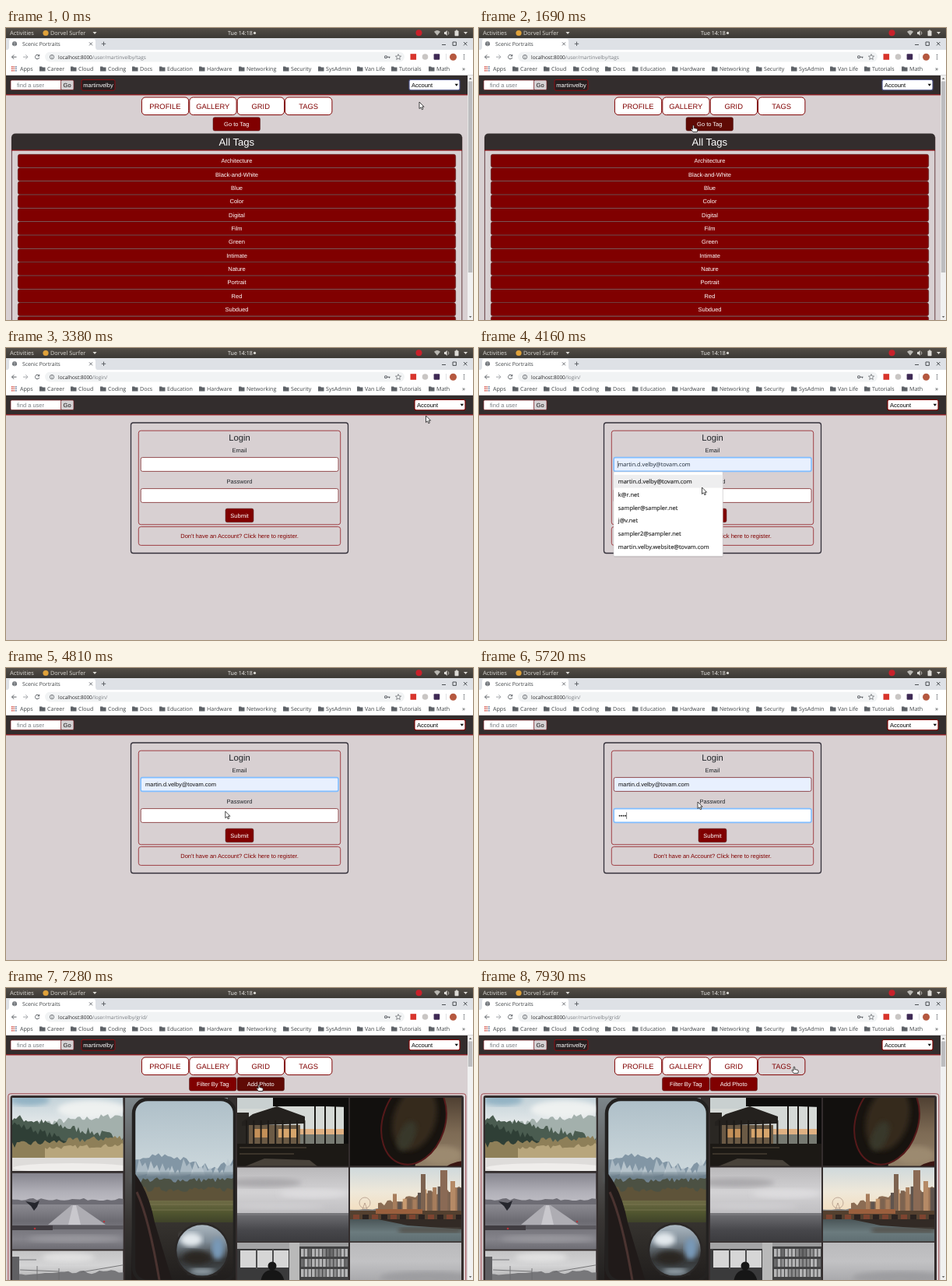
Animation of 600 by 375 pixels, one loop 8000 ms. Source, as an HTML page:

```html
<!DOCTYPE html>
<html lang="en">
<head>
<meta charset="utf-8">
<title>Scenic Portraits</title>
<style>
html, body { margin: 0; width: 100%; height: 100%; overflow: hidden; background: #d8d0d2; }
svg { display: block; width: 600px; height: 375px; }
text { font-family: "Liberation Sans", Arial, sans-serif; white-space: pre; text-rendering: geometricPrecision; }
.ui { font-family: "Open Sans", "Noto Sans", sans-serif; }
.mid { text-anchor: middle; }
.btn { fill: #800000; stroke: #4a1a1a; stroke-width: .5; }
.btn.over { fill: #5f0a05; }
.nav { fill: #fff; stroke: #800000; stroke-width: 1; }
.nav.over { fill: #ddd5d7; }
.box { fill: none; stroke: #921c22; stroke-width: .8; }
.field { fill: #fff; stroke: #7b2226; stroke-width: .8; }
.field.fill { fill: #e8f0fe; }
.field.focus { stroke: #80bdff; stroke-width: 1.6; }
</style>
</head>
<body>
<svg id="stage" viewBox="0 0 600 375"></svg>
<script>
const MAROON = '#800000', DARK = '#332d2d', PAGE = '#d8d0d2';
const USER = 'martinvelby', MAIL = 'martin.d.velby@tovam.com';
const STEP = 130, LOOP = 8000;

const rect = (x, y, w, h, fill, more = '') =>
  `<rect x="${x}" y="${y}" width="${w}" height="${h}" fill="${fill}" ${more}/>`;
const shape = (cls, x, y, w, h, r, more = '') =>
  `<rect class="${cls}" x="${x}" y="${y}" width="${w}" height="${h}" rx="${r}" ${more}/>`;
const text = (x, y, size, fill, str, cls = '', more = '') =>
  `<text x="${x}" y="${y}" font-size="${size}" fill="${fill}" class="${cls}" ${more}>${str}</text>`;
const path = (d, fill, more = '') => `<path d="${d}" fill="${fill}" ${more}/>`;
const line = (d, stroke, w = 1, more = '') =>
  `<path d="${d}" fill="none" stroke="${stroke}" stroke-width="${w}" ${more}/>`;
const disc = (x, y, r, fill, more = '') => `<circle cx="${x}" cy="${y}" r="${r}" fill="${fill}" ${more}/>`;
const oval = (x, y, rx, ry, fill, more = '') =>
  `<ellipse cx="${x}" cy="${y}" rx="${rx}" ry="${ry}" fill="${fill}" ${more}/>`;
const group = (id, body) => `<g id="${id}">${body}</g>`;
const range = (n, fn) => Array.from({ length: n }, (_, i) => fn(i)).join('');

let seed = 7;
const rand = () => (seed = seed * 16807 % 2147483647) / 2147483647;

let defs = '<filter id="soft"><feGaussianBlur stdDeviation=".7"/></filter>' +
  '<filter id="hazy"><feGaussianBlur stdDeviation="3"/></filter>';
const HAZY = 'filter="url(#hazy)"';
function grad(id, ...stops) {
  defs += `<linearGradient id="${id}" x2="0" y2="1">` + stops.map((c, i) =>
    `<stop offset="${i / (stops.length - 1)}" stop-color="${c}"/>`).join('') + '</linearGradient>';
  return `url(#${id})`;
}

// Jagged silhouette: height follows top(x), closed along the base line
function ridge(x0, x1, top, jag, base, step, fill) {
  let d = `M${x0} ${base}`;
  for (let x = x0; x <= x1; x += step) d += `L${x} ${(top(x) - rand() * jag).toFixed(1)}`;
  return path(d + `L${x1} ${base}Z`, fill);
}

function browser() {
  const marks = [[43, 'Career'], [83, 'Cloud'], [121, 'Coding'], [162, 'Docs'], [197, 'Education'],
    [248, 'Hardware'], [299, 'Networking'], [356, 'Security'], [401, 'SysAdmin'], [451, 'Van Life'],
    [495, 'Tutorials'], [543, 'Math']];
  const folder = x => path(`M${x} 49.5h3l1 1h3.5v5h-7.5z`, '#5f6368');
  const gray = '#5f6368', pale = '#dcdad5';
  return rect(0, 0, 600, 13, grad('panel', '#524d47', '#47433e', '#3b3935')) +
    text(5, 9, 7.5, pale, 'Activities', 'ui') +
    disc(51, 6.5, 3.6, '#e0a23a') +
    text(57, 9, 7.3, pale, 'Dorvel Surfer', 'ui') +
    path('M111.5 5h5l-2.5 3z', pale) +
    text(285, 9, 7.1, '#f2f1ee', 'Tue 14:18', 'ui') + disc(319.5, 6.4, 1.6, pale) +
    disc(530.5, 6.3, 4, '#c8202a') +
    path('M550 4.8q4-3.400 8 0l-4 5z', '#b9b7b2') +
    path('M563 5h1.600l2-2v7l-2-2H563z', pale) + line('M568 4.5q1.800 2 0 4', pale, .8) +
    rect(576.5, 3.6, 5, 6.6, pale, 'rx=".6"') + rect(578, 2.6, 2, 1.2, pale) +
    path('M588 5h5l-2.5 3z', pale) +
    rect(0, 13, 600, 15, '#dee1e6') +
    path('M2 28q2-1 2-3v-8q0-3 3-3h105q3 0 3 3v8q0 2 2 3z', '#fff') +
    disc(11, 20.3, 3, gray) + line('M8.3 19.3h5.4M9 22h4M11 17.3v6', '#c8cacd', .6) +
    text(21, 22.9, 6.8, '#3c4043', 'Scenic Portraits', 'ui') +
    line('M107 18.4l4 4m0-4l-4 4', gray, .9) + line('M122.8 20.3h5.4m-2.7-2.7v5.4', gray, 1) +
    line('M560 21.5h5M588 18l4.4 4.4m0-4.4l-4.4 4.4', '#3c4043', .9) +
    line('M574 18h4.4v4.4h-4.4z', '#3c4043', .9) +
    rect(0, 28, 600, 33, '#fff') +
    line('M13.5 37.2H7.5l2.8-2.8m-2.8 2.8l2.8 2.8', gray, 1) +
    line('M22 37.2h6l-2.8-2.8m2.8 2.8l-2.8 2.8', '#a5a8ac', 1) +
    line('M42.2 35.4a2.7 2.7 0 1 0 .5 2.6', gray, 1) + path('M43.2 33.6v2.9h-2.9z', gray) +
    rect(50, 30.8, 462, 12.6, '#f1f3f4', 'rx="6.3"') +
    disc(59, 37.2, 2.7, 'none', `stroke="${gray}" stroke-width=".8"`) + line('M59 36.6v2.2M59 35.2v.8', gray, .8) +
    disc(488, 37.2, 1.5, 'none', `stroke="${gray}" stroke-width="1.1"`) + line('M489.5 37.2h4m-1 0v1.6', gray, 1.1) +
    path('M504 33.6l1 2.4 2.6.2-2 1.7.7 2.6-2.3-1.4-2.3 1.4.7-2.6-2-1.7 2.6-.2z', 'none', `stroke="${gray}" stroke-width=".7"`) +
    rect(519.5, 33.2, 7.6, 7.6, '#d8342c') + disc(538.5, 37, 3.8, '#c9c6c4') +
    rect(549.6, 33.2, 7.6, 7.6, '#3f2a55', 'rx="1"') +
    line('M565.5 33v8', '#d0d3d6', .7) + disc(574.5, 37.2, 4.5, '#b5583f') +
    range(3, i => disc(588.5, 34.6 + i * 2.6, .8, gray)) +
    range(9, i => rect(7 + i % 3 * 2.5, 49 + (i / 3 | 0) * 2.5, 1.6, 1.6, ['#d9534a', '#c9655b', '#6a7f9e'][i % 3])) +
    text(18, 55, 7.1, '#3c4043', 'Apps', 'ui') +
    marks.map(([x, s]) => folder(x) + text(x + 10, 55, 7.1, '#3c4043', s, 'ui')).join('') +
    text(586, 55, 8, '#3c4043', '»', 'ui') + rect(0, 60, 600, 1, '#d5d5d6');
}

const address = rest =>
  text(67, 39.5, 6.5, '#202124', `localhost:8000<tspan fill="#777b80">${rest}</tspan>`, 'ui');

function header(w, user, outline = MAROON) {
  const x = w - 75;
  return rect(0, 61, w, 24.5, DARK) + rect(0, 85.2, w, 1.2, '#8c0d12') +
    rect(6, 67, 65, 12.5, '#fff', 'stroke="#7b2226" stroke-width=".7" rx="1.5"') +
    text(14, 75.7, 7.5, '#7b7f84', 'find a user') +
    rect(70.5, 67, 16.5, 12.5, '#d5d2d4', 'stroke="#7b2226" stroke-width=".7" rx="1.5"') +
    text(73.6, 75.9, 7.5, '#111', 'Go') +
    (user ? rect(97, 66.4, 43, 13.8, '#261f20', 'rx="2" stroke="#8c0d12"') + text(99.3, 75.9, 7.5, '#fff', USER) : '') +
    rect(x, 66.5, 65, 13.2, '#fff', `rx="2" stroke="${outline}" stroke-width="1.1"`) +
    text(x + 3, 75.6, 7.5, '#000', 'Account') + path(`M${x + 58.6} 71.8h4.4l-2.2 3z`, '#111');
}

const scrollbar = end => rect(593, 61, 7, 314, '#f1f1f1') + path('M594.8 66h3.6l-1.8-2.2z', '#6b6b6b') +
  path('M594.8 370h3.6l-1.8 2.2z', '#6b6b6b') + rect(593.8, 68.5, 5.4, end - 68.5, '#bdbdbf');

const tabs = () => ['PROFILE', 'GALLERY', 'GRID', 'TAGS'].map((s, i) => {
  const x = 174.4 + i * 61.4;
  return shape('nav hot', x, 89, 60.3, 22.6, 4.7) + text(x + 30, 103.7, 9.4, MAROON, s, 'mid');
}).join('');

const button = (x, y, w, h, s) => shape('btn hot', x, y, w, h, 2.2) +
  text(x + w / 2, y + h / 2 + 2.7, 7.5, '#fff', s, 'mid');

function tagsPage() {
  const tags = ['Architecture', 'Black-and-White', 'Blue', 'Color', 'Digital', 'Film', 'Green',
    'Intimate', 'Nature', 'Portrait', 'Red', 'Subdued', ''];
  return address(`/user/${USER}/tags`) + header(593, true, '#4a4f86') + scrollbar(314) + tabs() +
    button(266, 114.8, 60.5, 17.2, 'Go to Tag') +
    line('M7.4 375V140M585.8 375V140', '#5c3034', .9) +
    path('M7 157v-16q0-5.5 5.5-5.5h568q5.5 0 5.5 5.5v16z', DARK) + rect(7, 156.4, 579, 1.2, '#8c0d12') +
    text(296.3, 150.6, 13.1, '#fff', 'All Tags', 'mid') +
    tags.map((s, i) => {
      const y = 162.3 + i * 17.34;
      return shape('btn hot', 15.3, y, 562.4, 16.7, 2.4) + text(296.5, y + 10.9, 7.5, '#fff', s, 'mid');
    }).join('') +
    group('menu', rect(518, 79.8, 65.5, 11.4, '#3d9be9', 'stroke="#2f6ea8" stroke-width=".5"') +
      text(521.5, 87.8, 7.5, '#b9dcf8', 'Login'));
}

function loginPage() {
  const mails = [MAIL, 'k@r.net', 'sampler@sampler.net', 'j@v.net', 'sampler2@sampler.net',
    'martin.velby.website@tovam.com'];
  return address('/login/') + header(600, false) +
    rect(160.5, 96, 279, 167.5, 'none', 'rx="3" stroke="#34303a" stroke-width="1.3"') +
    shape('box', 170.3, 106.2, 259.4, 120.6, 3) + shape('box', 170.3, 229.6, 259.4, 23.8, 3) +
    text(300, 119.3, 11.25, '#212529', 'Login', 'mid') +
    text(300, 133.6, 7.5, '#212529', 'Email', 'mid') +
    shape('field', 173.2, 140.6, 253.8, 17.8, 2.2, 'id="mailBox"') +
    group('mailPeek', line('M178.3 145v9', '#222', .6) + text(178.4, 152.1, 7.3, '#1b2733', MAIL, 'ui')) +
    group('mailText', text(179, 152.1, 7.5, '#111', MAIL)) +
    text(300, 173.8, 7.5, '#212529', 'Password', 'mid') +
    shape('field', 173.2, 180.6, 253.8, 17.8, 2.2, 'id="passBox"') +
    range(8, i => disc(180.6 + i * 2.5, 189.7, .95, '#222', 'class="dot"')) +
    line('M0 185.3v8.6', '#222', .6, 'id="caret"') +
    button(282, 206.2, 36, 17.6, 'Submit') +
    text(300, 243.7, 7.5, MAROON, "Don't have an Account? Click here to register.", 'mid') +
    group('list', rect(173, 159.5, 140.5, 109, '#000', 'opacity=".14" rx="1.5"') +
      rect(173, 159, 140.3, 108.4, '#fff', 'stroke="#c4c0c2" stroke-width=".5" rx="1"') +
      rect(173, 162.8, 140.3, 16.8, '#eeeeef') +
      mails.map((s, i) => text(178.8, 173.7 + i * 16.9, 7.45, '#222', s, 'ui',
        'stroke="#222" stroke-width=".15"')).join(''));
}

function photo(x, y, w, h, fill, body) {
  const id = `clip${x}x${y}`;
  defs += `<clipPath id="${id}"><rect x="${x}" y="${y}" width="${w}" height="${h}"/></clipPath>`;
  return `<g clip-path="url(#${id})">${rect(x, y, w, h, fill)}<g filter="url(#soft)">${body}</g></g>`;
}

function photos() {
  const forest = photo(8, 141, 142.5, 94, grad('fog', '#c3d2d9', '#e2e7e8', '#dfe4e3', '#b9c1bd'),
    oval(30, 144, 26, 7, '#93b3c4', HAZY) + oval(110, 156, 44, 12, '#eef1f0', HAZY) +
    ridge(8, 152, x => 182 - x * .1, 8, 220, 3, '#a3b0ac') +
    ridge(8, 152, x => 169 + x * .19, 10, 222, 2.5, '#4a5c50') +
    ridge(8, 110, x => 176 + x * .3, 9, 222, 3, '#2f3f36') +
    ridge(8, 152, x => 206 - x * .07, 8, 224, 3, '#8e7f58') +
    ridge(50, 152, x => 210 - x * .04, 5, 224, 3, '#b8a67c') +
    rect(0, 218, 160, 20, '#dedcda') + oval(85, 231, 76, 6, '#efedeb'));
  const runway = photo(8, 237.5, 142.5, 98, grad('dusk', '#85848d', '#b1b0b8', '#c9c8ce', '#aaa9b0', '#77767d'),
    rect(0, 276, 160, 70, grad('ground', '#8e8d94', '#6c6b72', '#85848b', '#5a5960')) +
    ridge(0, 160, () => 273, 3, 278, 5, '#6d6c74') +
    path('M84 279h8l36 25H54z', '#aeadb3') + path('M86 279h4l6 25H80z', '#c9c8cd') +
    path('M25 274l12 2 6-3-3 8-4 5-4-6z', '#25262d') +
    path('M0 305h160v5H0z', '#5b595f') + rect(0, 305, 60, 6, '#403c41') +
    disc(37, 309, 1.3, '#b6343a') + disc(126, 300, 1.2, '#b6343a') + oval(88, 322, 60, 5, '#98979d', HAZY));
  const wires = photo(8, 337.3, 142.5, 38, grad('haze', '#c3c3c4', '#d4d4d5', '#adadae'),
    oval(80, 346, 34, 6, '#e2e2e2', HAZY) +
    ridge(0, 160, x => 371 - x * .03, 5, 380, 5, '#77777a') + rect(8, 345, 9, 35, '#606063') +
    line('M17 349h22M40 357v20M68 360v18M18 362l50 2M96 365l59-10', '#6b6b6e', .9));
  const mirror = photo(153, 141, 142, 234, grad('cabin', '#7d868a', '#5c5c5c', '#383533', '#22201f'),
    path('M285 141h12v240h-12z', '#33302f') +
    rect(164, 143, 130, 250, grad('glass', '#aebfc8', '#c9d5da', '#d9e0e3', '#b3bdc1'), 'rx="18"') +
    ridge(164, 296, x => 226 - 7 * Math.sin((x - 170) / 20), 8, 275, 4, '#8296a5') +
    range(9, i => path(`M${166 + i * 14} 243l${5 + i % 3} ${-24 + i % 4 * 3}l4 10 4-5 5 14z`, i % 2 ? '#cdd7dd' : '#bac7d0', 'opacity=".7"')) +
    rect(164, 238, 131, 12, '#6c7f8a', HAZY) +
    ridge(164, 296, () => 250, 7, 280, 3, '#4c5143') + ridge(164, 296, () => 262, 7, 290, 3, '#5e5339') +
    rect(164, 273, 131, 32, grad('field', '#6f6c46', '#50552f', '#393c27')) +
    line('M164 278h131M164 285h131', '#8d8763', .5) +
    rect(164, 301, 131, 80, grad('door', '#36332f', '#1f1c1b')) +
    path('M163 235q20 24 28 66l24 80h-54z', '#201a19') + line('M168 262q16 34 30 119', '#4a3330', 3) +
    disc(252, 337, 34, grad('bubble', '#aebac3', '#7f8c97', '#333434', '#4b545a')) +
    oval(238, 323, 14, 9, '#e3e9ed', HAZY) + oval(272, 335, 8, 14, '#7899b8', HAZY) +
    oval(245, 346, 18, 9, '#2c2824', HAZY) + oval(252, 364, 16, 4, '#9aa7b0', HAZY) +
    disc(252, 337, 34, 'none', 'stroke="#2a2726" stroke-width="2.5"') +
    rect(164, 143, 130, 234, 'none', 'rx="18" stroke="#232120" stroke-width="4.5"'));
  const pavilion = photo(297, 141, 143, 87.5, '#110f0d',
    rect(297, 152, 143, 36, '#d5d9d6') + rect(297, 141, 46, 14, '#c9d0d0') +
    rect(297, 181, 143, 8, '#e0b183') + rect(297, 188, 143, 13, '#777a72') +
    path('M343 141h97v12l-30-1-67-2z', '#0e0d0c') + rect(297, 160, 15, 46, '#2a2723') +
    path('M303 172l14-10 31-10 36 13v9l-81 3z', '#24211e') +
    path('M312 176h66v24h-66z', '#6b5a45') + rect(318, 181, 20, 11, '#c49058') + rect(350, 181, 24, 11, '#d6a56c') +
    range(9, i => rect(308 + i * 9.3, 170, 2, 40, '#1d1a17')) +
    range(4, i => rect(396 + i * 13, 152, 2, 55, '#1a1815')) + rect(434, 148, 8, 81, '#0e0d0c') +
    rect(290, 200, 155, 35, '#1c1915') + line('M300 205h86M300 213h70', '#5a5041', 1.2) +
    path('M300 232l32-13 58 2 14 11z', '#48423a'));
  const visor = photo(442, 141, 143, 87.5, '#12100e',
    path('M535 135h60v100h-70z', grad('paint', '#4a3b2e', '#7d6a54', '#94826a')) +
    oval(560, 215, 26, 12, '#9c8a70', HAZY) +
    oval(524, 172, 40, 56, '#17130f', 'transform="rotate(18 524 172)" stroke="#55191a" stroke-width="2"') +
    oval(525, 168, 27, 42, '#35291f', 'transform="rotate(18 525 168)" ' + HAZY) +
    oval(515, 190, 10, 20, '#37382c', 'transform="rotate(24 515 190)" ' + HAZY) +
    path('M560 235q8-12 35-14v14z', '#3a1613'));
  const sea = photo(297, 230.3, 143, 95, grad('cloud', '#b9b8ba', '#d3d2d4', '#bcbbbe', '#a8a8ab'),
    oval(330, 250, 50, 6, '#aaa9ac', HAZY) + oval(395, 264, 44, 6, '#dddcde', HAZY) +
    oval(350, 280, 60, 4, '#cfced0', HAZY) + rect(290, 289, 155, 4, '#77777b') +
    rect(290, 292, 155, 38, grad('swell', '#6b6b6f', '#47474b', '#38383b')));
  const city = photo(442, 230.3, 143, 95, grad('dawn', '#cfd9dc', '#efe8d9', '#f4dcb9', '#d9b38c'),
    ridge(435, 590, () => 285, 3, 300, 6, '#7d7f80') +
    ridge(478, 590, x => 283 - (x - 478) * .2, 9, 300, 4, '#8b6c53') +
    range(14, i => { const h = 12 + rand() * 14 + i; return rect(497 + i * 6.4, 288 - h, 5, h, ['#a77d5c', '#5f544e', '#c79a70', '#7d6350'][i % 4]); }) +
    rect(533, 239, 6, 50, '#7d6350') + rect(558, 234, 9, 55, '#8a6a55') + rect(571, 248, 6, 41, '#b58a66') +
    disc(461, 276, 7, 'none', 'stroke="#b39a88" stroke-width=".8"') + line('M461 276l-4 11m4-11l4 11', '#9c7f70', .6) +
    rect(435, 286, 155, 12, '#54402f') + rect(475, 284, 60, 6, '#9a5f3d') +
    rect(435, 297, 155, 33, grad('bay', '#4a5557', '#6b7b7e', '#5b6a6e')) +
    range(12, i => rect(446 + i * 12, 291, 8, 6, i % 2 ? '#2b2320' : '#7d4430')) +
    path('M478 297h110v13l-72-5z', '#322a25') + rect(505, 308, 80, 6, '#4f4a42', HAZY));
  const room = photo(297, 327, 143, 48, '#3a3a3b',
    rect(290, 327, 80, 8, '#a4a4a5') + rect(301, 337, 62, 22, '#d6d6d6') +
    line('M322 335v26M343 335v26', '#4d4d4e', 2) +
    rect(364, 327, 13, 50, '#b9b9b9') + rect(377, 333, 66, 44, '#434344') + rect(377, 327, 66, 5, '#9b9b9c') +
    range(39, i => rect(379 + i % 13 * 4.7, 335 + (i / 13 | 0) * 13, 3.6, 10, ['#8b8b8c', '#b5b5b6', '#6a6a6b'][rand() * 3 | 0])) +
    disc(342, 357, 5.5, '#161616') + path('M327 378q2-16 15-16t16 16z', '#161616'));
  const shore = photo(442, 326.7, 143, 49, grad('mist', '#bababc', '#c2c2c4', '#a9a9ac'),
    oval(540, 372, 60, 8, '#9d9da0', HAZY));
  return forest + runway + wires + mirror + pavilion + visor + sea + city + room + shore;
}

function gridPage() {
  return address(`/user/${USER}/grid/`) + header(593, true) + scrollbar(101) + tabs() +
    button(235.5, 114.8, 60.5, 17.2, 'Filter By Tag') + button(297, 114.8, 60.5, 17.2, 'Add Photo') +
    rect(2.8, 135.8, 588, 250, 'none', 'rx="3" stroke="#9a3a40" stroke-width=".9"') +
    rect(5.6, 138, 582.4, 250, DARK, 'rx="3"') + photos();
}

const edge = 'stroke="#1a1a1a" stroke-width=".8" stroke-linejoin="round"';
const body = browser() + group('tags', tagsPage()) + group('login', loginPage()) + group('grid', gridPage()) +
  group('arrow', path('M0 0v8.6l2-1.8 1.4 3 1.5-.7-1.4-2.9h2.6z', '#fff', edge)) +
  group('hand', path('M-.9 .6q.9-1.2 1.7 0v3l3.3 .6q1.3 .3 1.2 1.6l-.5 2.7H-.6L-3 5.2q-.2-1 .8-1l1.3 1z', '#fff', edge));
const stage = document.getElementById('stage');
stage.innerHTML = `<defs>${defs}</defs>${rect(0, 0, 600, 375, PAGE)}${body}`;

const el = id => document.getElementById(id);
const show = (node, on) => { node.style.display = on ? '' : 'none'; };
const scenes = ['tags', 'login', 'grid'].map(el);
const hots = scenes.map(s => [...s.querySelectorAll('.hot')]);
const dots = [...stage.querySelectorAll('.dot')];

// Pointer stops: time, x, y
const stops = [[0, 531, 95], [130, 531, 95], [520, 290, 147], [910, 46, 74], [1300, 220, 357],
  [1690, 275.5, 125], [2080, 275.5, 125], [2600, 545, 74], [2730, 545, 74], [2990, 539.5, 87],
  [3380, 539.5, 87], [3900, 290, 150], [4160, 286.5, 179], [4550, 284, 173], [4940, 281, 188],
  [5330, 281, 172], [6890, 281, 172], [7280, 325, 124], [7800, 405, 101], [8000, 405, 101]];

function pointer(t) {
  const i = stops.findIndex(s => s[0] > t);
  const [t0, x0, y0] = stops[i - 1], [t1, x1, y1] = stops[i];
  const k = (t - t0) / (t1 - t0), e = k * k * (3 - 2 * k);
  return [x0 + (x1 - x0) * e, y0 + (y1 - y0) * e];
}

function inside(node, x, y) {
  const v = n => +node.getAttribute(n);
  return x >= v('x') && x <= v('x') + v('width') && y >= v('y') && y <= v('y') + v('height');
}

function draw(t) {
  const scene = t < 3250 ? 0 : t < 6500 ? 1 : 2;
  scenes.forEach((s, i) => show(s, i === scene));
  show(el('menu'), t >= 2730);

  const listed = t >= 3900 && t < 4680, typing = t >= 4940;
  show(el('list'), listed);
  show(el('mailPeek'), listed);
  show(el('mailText'), t >= 4680);
  el('mailBox').setAttribute('class', 'field' + (t >= 3900 ? ' fill' : '') + (t >= 3900 && !typing ? ' focus' : ''));
  el('passBox').setAttribute('class', 'field' + (typing ? ' focus' : ''));
  const typed = t >= 6110 ? 8 : Math.max(0, Math.min(5, Math.floor((t - 5200) / STEP)));
  dots.forEach((d, i) => show(d, i < typed));
  show(el('caret'), typing);
  el('caret').setAttribute('transform', `translate(${179.6 + typed * 2.5} 0)`);

  const [x, y] = pointer(t);
  let over = false;
  for (const node of hots[scene]) {
    const hit = inside(node, x, y);
    node.classList.toggle('over', hit);
    over = over || hit;
  }
  for (const id of ['arrow', 'hand']) {
    show(el(id), (id === 'hand') === over);
    el(id).setAttribute('transform', `translate(${x.toFixed(1)} ${y.toFixed(1)})`);
  }
}

function tick() {
  draw(Math.floor(performance.now() % LOOP / STEP) * STEP);
  requestAnimationFrame(tick);
}
tick();
</script>
</body>
</html>
```
